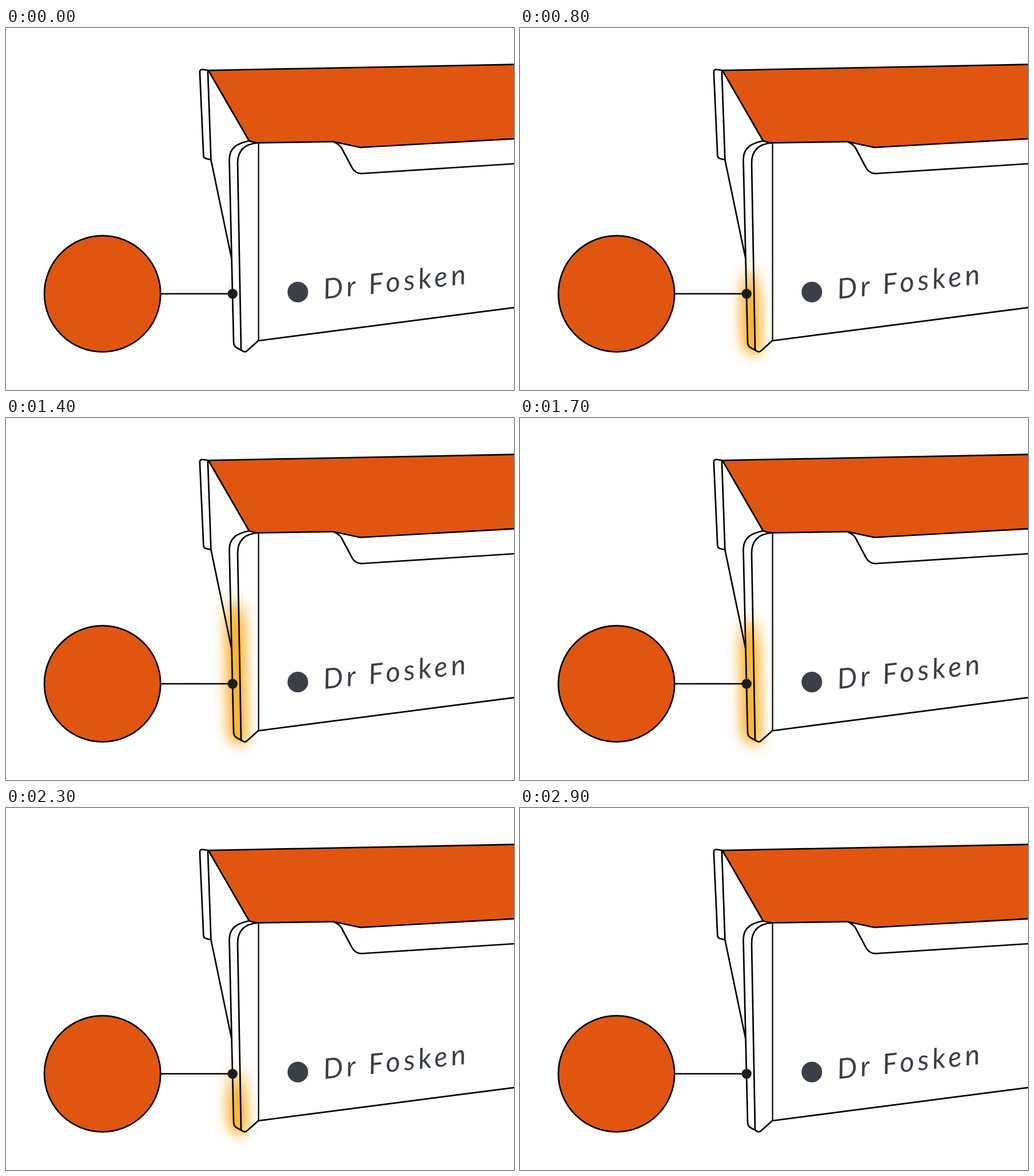
Animation of 886x632 px, one loop 3 s. Source, as an HTML page:

```html
<!DOCTYPE html>
<html lang="en">
<head>
<meta charset="utf-8">
<title>Status light</title>
<style>
  html, body { margin: 0; width: 100%; height: 100%; overflow: hidden; background: #fff; }
  svg { display: block; }
  .line { fill: none; stroke: #000; stroke-width: 2.7; stroke-linejoin: round; stroke-linecap: round; }
  .orange { fill: #e05611; }
  .label { font: italic 400 49px Lato, "Open Sans", sans-serif; letter-spacing: 6px; fill: #3b3f47; }
</style>
</head>
<body>
<svg width="886" height="632" viewBox="0 0 886 632">
  <defs>
    <linearGradient id="fade" gradientUnits="userSpaceOnUse" x1="0" x2="0">
      <stop offset="0" stop-color="#f9b02c" stop-opacity=".1"/>
      <stop offset="1" stop-color="#f9b02c"/>
    </linearGradient>
    <filter id="blur" filterUnits="userSpaceOnUse" x="300" y="230" width="220" height="402" color-interpolation-filters="sRGB">
      <feGaussianBlur stdDeviation="11"/>
    </filter>
  </defs>

  <g id="light" fill="url(#fade)">
    <polygon class="lit" stroke="url(#fade)" stroke-width="22" stroke-linejoin="round" filter="url(#blur)"/>
    <polygon class="lit" opacity=".4"/>
  </g>

  <g class="line">
    <!-- lid -->
    <path class="orange" d="M353 74L892 63.6V193L618 208.5L570 198.3L440 200.5Q431 200 424 197Z"/>
    <path d="M353 74L343 72.5Q337.5 72 338 78L344.5 223Q345 227 349 228L357.5 230"/>
    <path d="M352 76L357.5 230L393.5 403"/>
    <!-- side strip -->
    <path d="M424 197C406 201 389.5 207 389.5 230L397 548Q397 555 402 558L413 564Q417 567 421 563L440 546"/>
    <path d="M440 200.5C418 202 404 212 404 236L410 561"/>
    <!-- front -->
    <path d="M440.5 200V546" stroke-width="2.2"/>
    <path d="M440 546L892 487.3"/>
    <path d="M570 198.3Q580 202 585 209L603 243Q609 255 622 254L892 236.6"/>
    <!-- callout -->
    <circle class="orange" cx="168.2" cy="464" r="101.3"/>
    <path d="M270 464H395"/>
  </g>
  <circle cx="395.2" cy="464" r="8.7" fill="#1d1d1b"/>

  <circle cx="509" cy="461" r="18" fill="#3b3f47"/>
  <text class="label" transform="translate(555 473) rotate(-6)">Dr Fosken</text>
</svg>
<script>
  const STEP = 100, LOOP = 3000, LAST = LOOP / STEP - 1;
  const light = document.getElementById('light');
  const fade = document.getElementById('fade');
  const bars = document.querySelectorAll('.lit');

  // The strip's two edges lean slightly to the right on the way down.
  const leftX = y => 389.5 + (y - 230) * 7.5 / 318;
  const rightX = y => 404 + (y - 236) * 6 / 325;

  function draw(now) {
    const step = Math.floor(now % LOOP / STEP);
    const level = Math.min(step, LAST - step);
    const top = 572 - 18 * level;
    light.style.display = level ? '' : 'none';
    fade.setAttribute('y1', top - 12);
    fade.setAttribute('y2', top + 48);
    const points = `${leftX(top)},${top} ${rightX(top)},${top} 410,561 402,557 ${leftX(550)},550`;
    bars.forEach(bar => bar.setAttribute('points', points));
  }

  const start = performance.now();
  function tick() {
    draw(performance.now() - start);
    requestAnimationFrame(tick);
  }
  tick();
</script>
</body>
</html>
```
